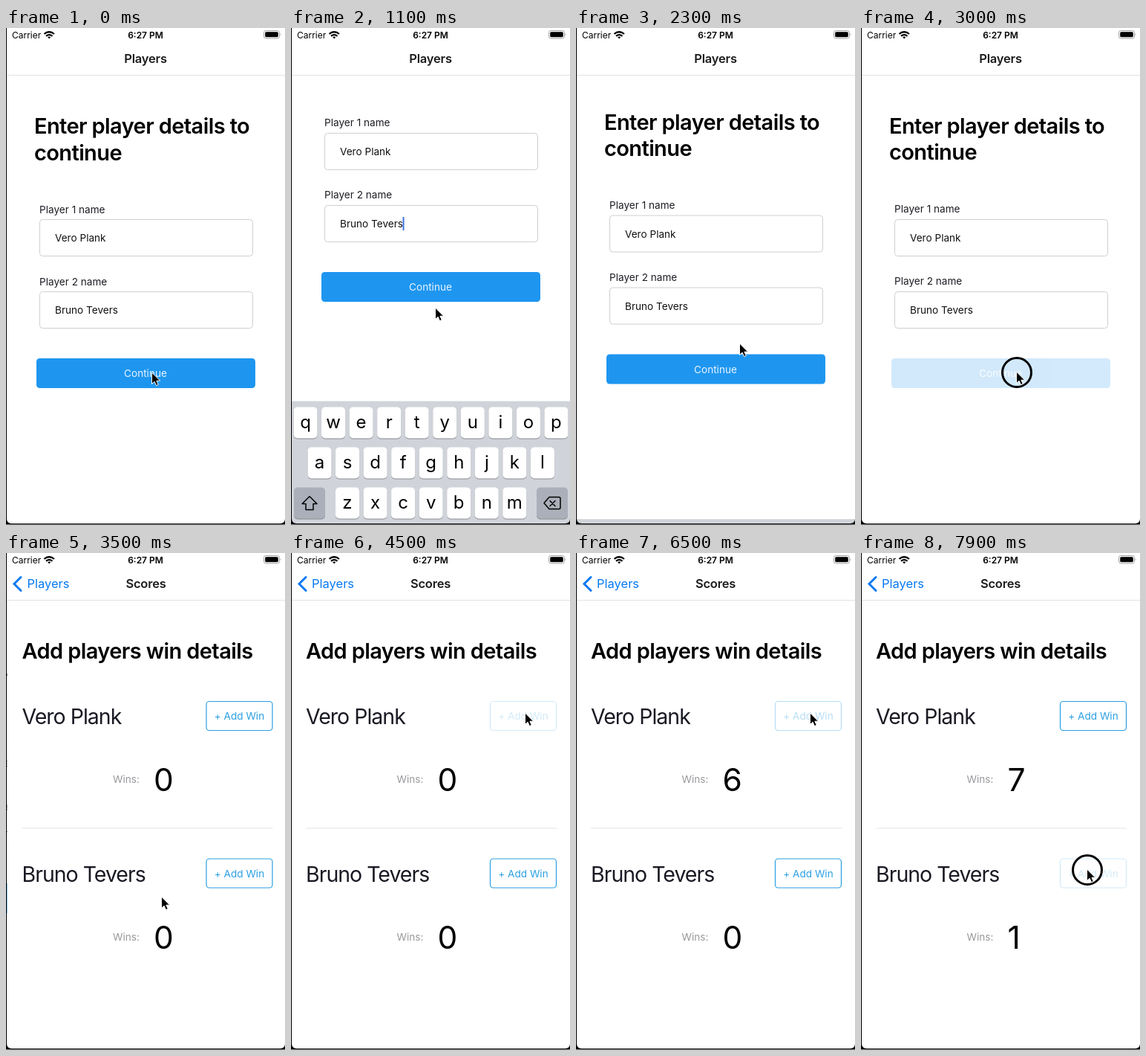
Animation of 376 by 668 pixels, one loop 8000 ms. Source, as an HTML page:

```html
<!DOCTYPE html>
<html lang="en">
<head>
<meta charset="utf-8">
<title>Score keeper</title>
<style>
  html, body { margin: 0; width: 100%; height: 100%; overflow: hidden; background: #fff; }
  svg { display: block; width: 376px; height: 668px; font-family: Inter, Roboto, sans-serif; }
  text { white-space: pre; }
</style>
</head>
<body>
<svg id="stage" viewBox="0 0 376 668"></svg>
<script>
const LOOP = 8000;
const PLAYERS = ['Vero Plank', 'Bruno Tevers'];
const BLUE = '#1e96f0', LINK = '#087af2', OUTLINE = '#2a9fe2';

const text = (x, y, size, str, attrs = '') =>
  `<text x="${x}" y="${y}" font-size="${size}" ${attrs}>${str}</text>`;
const rect = (x, y, w, h, attrs = '') =>
  `<rect x="${x}" y="${y}" width="${w}" height="${h}" ${attrs}/>`;
const heading = (x, y, str) => text(x, y, 29, str, 'font-weight="600" letter-spacing="-.6"');
const title = (id, str) =>
  text(188, 47, 16.5, str, `id="${id}" font-weight="600" letter-spacing="-.2" text-anchor="middle" fill="#1c1c1e"`);

const field = (i) => {
  const y = 97 * i;
  return text(45, 248.5 + y, 13.6, `Player ${i + 1} name`, 'fill="#1c1c24"') +
    rect(45.5, 257.5 + y, 287, 49, 'rx="4" fill="#fff" stroke="#cfcfd2"') +
    text(66, 287 + y, 13.6, PLAYERS[i], `id="name${i}" fill="#111"`);
};

const scoreCard = (i) => {
  const y = 211.5 * i;
  return text(20, 230 + y, 28.5, PLAYERS[i], 'letter-spacing="-1" fill="#1a1a24"') +
    `<g id="add${i}">` +
    rect(268.5, 199.5 + y, 89, 39, `rx="4" fill="#fff" stroke="${OUTLINE}" stroke-width="1.2"`) +
    text(313, 224 + y, 13.6, '+ Add Win', `text-anchor="middle" fill="${OUTLINE}"`) + '</g>' +
    text(142.5, 309 + y, 13.6, 'Wins:', 'fill="#98989c"') +
    text(197.5, 320 + y, 42.5, '0', `id="wins${i}"`);
};

const key = (x, y, w, label, size, fill = '#fff') =>
  rect(x, y + 1, w, 42, 'rx="5" fill="#898b90"') +
  rect(x, y, w, 42, `rx="5" fill="${fill}"`) +
  text(x + w / 2, y + (size > 20 ? 28 : 26.5), size, label, 'text-anchor="middle"');

const letterRow = (letters, x, y) =>
  [...letters].map((c, i) => key(x + 37.55 * i, y, 32, c, 24)).join('');

const keyboard = () => {
  const dark = '#abafba';
  return rect(0, 0, 376, 220, 'fill="#d0d3d9"') +
    letterRow('qwertyuiop', 3.5, 8) + letterRow('asdfghjkl', 22.5, 62) + letterRow('zxcvbnm', 60, 116) +
    key(4, 116, 42, '', 15, dark) + key(331, 116, 42, '', 15, dark) +
    key(4, 170, 40, '123', 15.5, dark) + key(51, 170, 40, '', 15, dark) + key(97, 170, 32, '', 15) +
    key(135, 170, 144, 'space', 15.5) + key(285, 170, 88, 'return', 15.5, dark) +
    `<g fill="none" stroke="#000" stroke-width="1.5" stroke-linejoin="round" stroke-linecap="round">
      <path d="M25 128l10 10h-5v8h-10v-8h-5z"/>
      <path d="M348 129h13q2 0 2 2v12q0 2-2 2h-13l-7-8zM349 134l7 7m0-7l-7 7"/>
      <circle cx="71" cy="191" r="9"/>
      <path d="M65.5 192.5h11q-1 5-5.5 5t-5.5-5z"/>
      <path d="M68 186.5v2m6-2v2" stroke-width="2"/>
      <rect x="110" y="181" width="6" height="13" rx="3"/>
      <path d="M106.5 189v2q0 6 6.5 6t6.5-6v-2M113 197v4m-3.5 0h7"/>
    </g>`;
};

const statusBar = () =>
  text(8, 14, 12, 'Carrier') +
  text(188, 14, 12, '6:27 PM', 'font-weight="600" text-anchor="middle"') +
  `<g fill="none" stroke="#000" stroke-width="2.2">
    <path d="M51.5 8q6.5-5.5 13.5 0M54 10.8q4.2-3.4 8.5 0"/>
    <path d="M58.2 14.5l-2-2.2q2-1.5 4 0z" fill="#000" stroke="none"/>
  </g>` +
  rect(347.5, 3.5, 21, 10.5, 'rx="2.8" fill="none" stroke="#a4a4a4"') +
  rect(349.2, 5.2, 17.6, 7.1, 'rx="1.6"') +
  '<path d="M369.7 7q1.8 1.8 0 3.6z" fill="#999"/>';

document.getElementById('stage').innerHTML = `
  ${rect(0, 0, 376, 668, 'fill="#fff"')}
  <g id="form">
    <g id="scroll">
      ${heading(38, 142, 'Enter player details to')}${heading(38, 177.5, 'continue')}
      ${field(0)}${field(1)}
      ${rect(0, 370, 2, 18, 'id="caret" fill="#3f73df"')}
      <g id="continue">
        ${rect(41, 444, 295, 40, `rx="4.5" fill="${BLUE}"`)}
        ${text(188, 469, 13.6, 'Continue', 'text-anchor="middle" fill="#eaf5ff"')}
      </g>
    </g>
  </g>
  <g id="keyboard">${keyboard()}</g>
  ${rect(0, 64, 376, 604, 'id="dim"')}
  <g id="scores">
    ${rect(0, 0, 376, 668, 'fill="#fff"')}
    ${heading(20, 142, 'Add players win details')}
    ${scoreCard(0)}${scoreCard(1)}
    ${rect(20, 369.5, 338, 1, 'fill="#e3e3e5"')}
  </g>
  ${rect(0, 0, 376, 63, 'fill="#fff"')}${rect(0, 63, 376, 1, 'fill="#e2e2e4"')}
  ${statusBar()}
  ${title('formTitle', 'Players')}${title('scoresTitle', 'Scores')}
  <path id="chevron" d="M20 32.5l-9 9 9 9" fill="none" stroke="${LINK}" stroke-width="3" stroke-linecap="round"/>
  ${text(28, 47, 16.5, 'Players', `id="back" fill="${LINK}"`)}
  <path d="M0 0H1V659.5q0 6.5 6.5 6.5H369.5q6.500 0 6.5-6.5V668H0z"/>
  ${rect(0, 667, 376, 1, 'fill="#8a8a8a"')}
  <g id="pointer">
    <circle id="ring" r="19.5" fill="none" stroke="#000" stroke-width="3"/>
    <path d="M-.5 -1V14.5L3.1 11.2 5.5 16.6 8.3 15.4 5.9 10.2H10.7Z" stroke="#fff"/>
  </g>`;

const el = {};
document.querySelectorAll('[id]').forEach(node => el[node.id] = node);
const move = (node, x, y) => node.setAttribute('transform', `translate(${x} ${y})`);
const fade = (node, opacity) => node.setAttribute('opacity', opacity);
const spring = (ms, w) => ms <= 0 ? 0 : 1 - (1 + w * ms / 1000) * Math.exp(-w * ms / 1000);

// Pointer stops: time, x, y
const path = [
  [0, 197, 464], [300, 197, 464], [750, 195, 377], [1200, 195, 377], [1500, 207, 319], [1570, 207, 319],
  [1860, 221, 425], [2350, 221, 425], [2850, 210, 463], [4180, 210, 463], [4490, 316, 216],
  [6930, 316, 216], [7400, 305, 426], [LOOP, 305, 426]
];
const pointerAt = (t) => {
  const i = path.findIndex(stop => stop[0] > t);
  const [t0, x0, y0] = path[i - 1], [t1, x1, y1] = path[i];
  const u = (t - t0) / (t1 - t0), s = u * u * (3 - 2 * u);
  return [x0 + (x1 - x0) * s, y0 + (y1 - y0) * s];
};

const HOLD = 150;
const winTaps = [Array.from({ length: 7 }, (_, i) => 4500 + 365 * i), [7450, 7800]];
const continueTap = 2960;
const allTaps = [810, 1840, continueTap, ...winTaps.flat()];

// A pressed control drops to 20% and recovers after release
const pressOpacity = (t, taps) => {
  const age = t - Math.max(...taps.filter(p => p <= t));
  return age < HOLD ? 0.2 : Math.min(1, 0.2 + 0.8 * (age - HOLD) / 150);
};

function draw(t) {
  const up = spring(t - 928, 16) - spring(t - 1980, 16);
  move(el.scroll, 0, -152 * up);
  move(el.keyboard, 0, 668 - 218 * up);
  fade(el.caret, t > 900 && t < 1980 ? 1 : 0);
  fade(el.continue, pressOpacity(t, [continueTap]));

  const push = spring(t - 3110, 20);
  move(el.form, -113 * push, 0);
  move(el.scores, t < 3900 ? Math.max(1.5, 376 * (1 - push)) : 0, 0);
  fade(el.dim, 0.1 * push);
  move(el.formTitle, -131 * push, 0);
  fade(el.formTitle, Math.max(0, 1 - 1.5 * push));
  move(el.back, 131 * (1 - push), 0);
  fade(el.back, push);
  fade(el.chevron, push);
  move(el.scoresTitle, 150 * (1 - push), 0);
  fade(el.scoresTitle, push);

  winTaps.forEach((taps, i) => {
    fade(el['add' + i], pressOpacity(t, taps));
    el['wins' + i].textContent = taps.filter(p => t >= p + HOLD).length;
  });

  move(el.pointer, ...pointerAt(t));
  fade(el.ring, allTaps.some(p => t >= p + 40 && t < p + HOLD) ? 1 : 0);
}

function tick() {
  draw(performance.now() % LOOP);
  requestAnimationFrame(tick);
}
el.caret.setAttribute('x', 66 + el.name1.getComputedTextLength() - 0.5);
tick();
</script>
</body>
</html>
```
